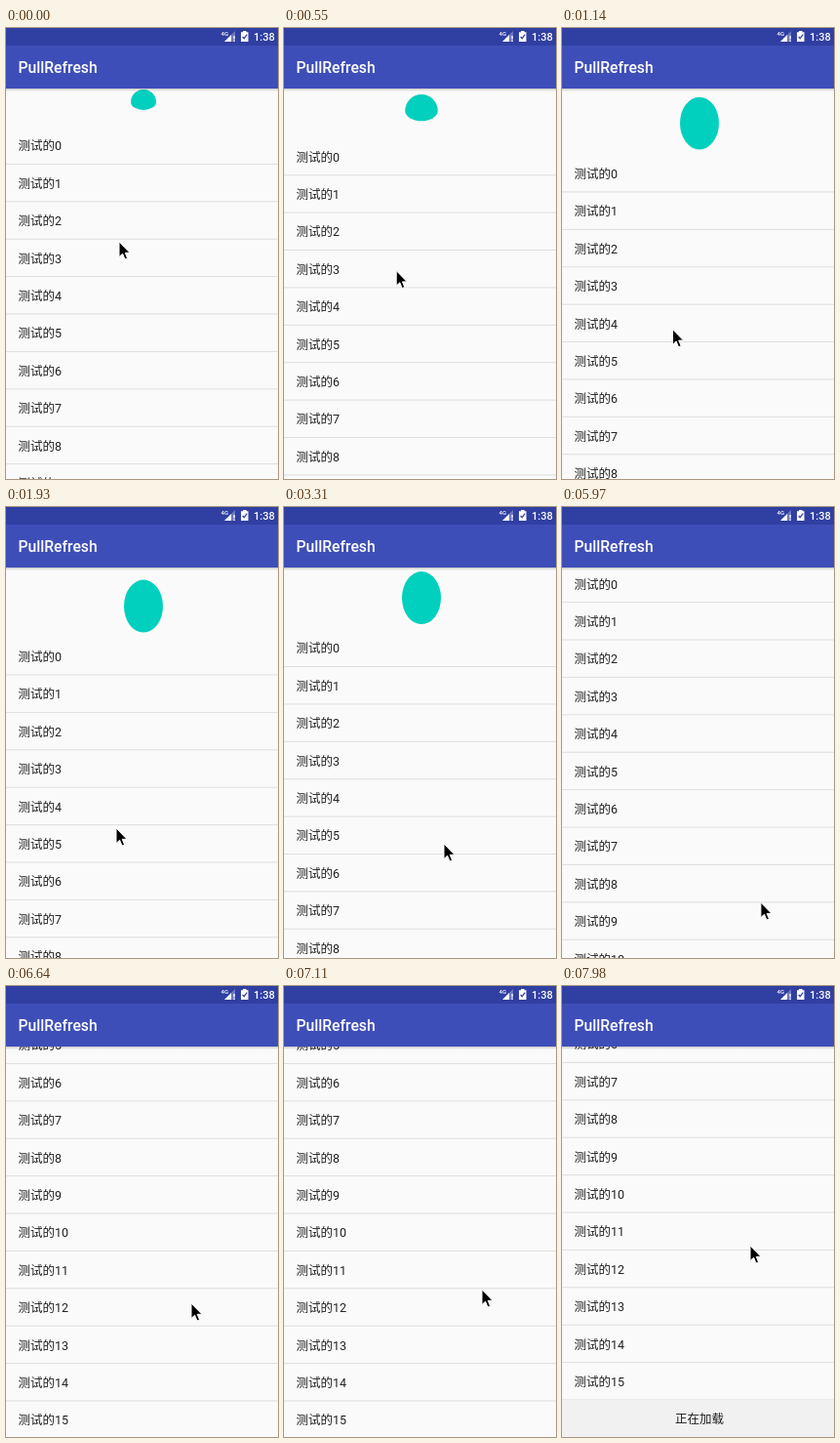
Animation of 279 by 462 pixels, one loop 8000 ms. Source, as an HTML page:

```html
<!DOCTYPE html>
<html lang="zh-CN">
<head>
<meta charset="utf-8">
<title>PullRefresh</title>
<style>
html, body { margin: 0; width: 100%; height: 100%; overflow: hidden; background: #fafafa; }
svg { display: block; width: 279px; height: 462px; }
text { font-family: Roboto, "Noto Sans CJK SC", "Noto Sans CJK", sans-serif; }
#list text { font-size: 12.5px; fill: #212121; }
.bar { font-weight: 500; fill: #fff; }
</style>
</head>
<body>
<svg viewBox="0 0 279 462">
  <defs>
    <linearGradient id="shade" x2="0" y2="1">
      <stop stop-opacity=".2"/><stop offset="1" stop-opacity="0"/>
    </linearGradient>
  </defs>
  <rect width="279" height="462" fill="#fafafa"/>
  <g id="list"><path id="blob" fill="#00d0bd"/></g>
  <rect y="62" width="279" height="3" fill="url(#shade)"/>
  <rect y="18" width="279" height="44" fill="#3e4eb8"/>
  <rect width="279" height="18" fill="#303fa2"/>
  <text class="bar" x="12.5" y="46" font-size="15.7">PullRefresh</text>
  <text class="bar" x="220.5" y="7.5" font-size="6">4G</text>
  <path d="M235 3V14H224Z" fill="#fff" opacity=".3"/>
  <path d="M231 7V14H224ZM233.4 8h1.3v3.5h-1.3zM233.4 12.5h1.3v1.5h-1.3z" fill="#fff"/>
  <path d="M241 4.2h2V3h3.5v1.2h2V14H241Z" fill="#fff"/>
  <path d="M242.6 9l1.6 1.7l3-4" fill="none" stroke="#303fa2" stroke-width="1.2"/>
  <text class="bar" x="254" y="13" font-size="11">1:38</text>
  <path id="cursor" d="M0 0V15.5L3.6 12.2L6 18L8.6 16.9L6.2 11.3H11Z" stroke="#fff"/>
</svg>
<script>
const LOOP = 8000, TOP = 62, ROW = 38.4, ROWS = 16;
const START = { x: 116, y: 219 };
// Pointer moves: begin, end, dx, dy
const MOVES = [
  [30, 1560, -3, 110],
  [2790, 3310, 51, 16],
  [3310, 3600, 100, 99],
  [3700, 4330, -32, -39],
  [5530, 5800, -28, 3],
  [5940, 6400, -7, -222],
  [6400, 6640, -7, 139],
  [6760, 7110, 13, -14],
  [7350, 7980, -10, -45]
];
const CLOSE = 5090, FOOTER = 7650;
const $ = id => document.getElementById(id);
const list = $("list"), blob = $("blob"), cursor = $("cursor");

function add(tag, attrs, label = "") {
  const el = document.createElementNS("http://www.w3.org/2000/svg", tag);
  for (const k in attrs) el.setAttribute(k, attrs[k]);
  el.textContent = label;
  list.append(el);
}
for (let i = 0; i < ROWS; i++) {
  add("text", { x: 12.5, y: i * ROW + 24.4 }, "测试的" + i);
  add("rect", { y: (i + 1) * ROW - 0.5, width: 279, height: 1, fill: "#dedede" });
}
add("rect", { y: ROWS * ROW, width: 279, height: 40, fill: "#f1f1f1" });
add("text", { x: 141, y: ROWS * ROW + 24.4, "text-anchor": "middle" }, "正在加载");

const mix = (a, b, u) => a + (b - a) * u;
const ramp = (t, a, b) => Math.min(1, Math.max(0, (t - a) / (b - a)));
const smooth = (t, a, b) => { const u = ramp(t, a, b); return u * u * (3 - 2 * u); };

function pointer(t) {
  let { x, y } = START;
  for (const [a, b, dx, dy] of MOVES) {
    const u = smooth(t, a, b);
    x += dx * u;
    y += dy * u;
  }
  return { x, y };
}

function listOffset(t, pulled) {
  if (t < 1960) return 39 + 0.414 * pulled - 0.00107 * pulled ** 2; // resisted pull
  if (t < CLOSE) return mix(71.6, 63.1, smooth(t, 1960, 2350));
  if (t < 5940) return 63.1 * (1 - ramp(t, CLOSE, 5320)) ** 2;
  return t < FOOTER ? -213 * smooth(t, 5940, 6400) : -252.4;
}

function draw(now) {
  const t = now % LOOP;
  const { x, y } = pointer(t);
  const offset = listOffset(t, y - START.y);
  const closing = t >= CLOSE;
  const size = closing ? 1 : Math.min(1, offset / 60);
  const grow = closing ? 0 : smooth(t, 840, 1160);
  const up = mix(20, 27, grow), down = mix(12.5, 27, grow);
  blob.setAttribute("d", `M-20 ${-down}a20 ${up} 0 0 1 40 0a20 ${down} 0 0 1-40 0`);
  blob.setAttribute("transform", `translate(141 ${mix(-17, -5, grow)}) scale(${size})`);
  list.setAttribute("transform", `translate(0 ${TOP + offset})`);
  cursor.setAttribute("transform", `translate(${x} ${y})`);
  requestAnimationFrame(draw);
}
requestAnimationFrame(draw);
</script>
</body>
</html>
```
